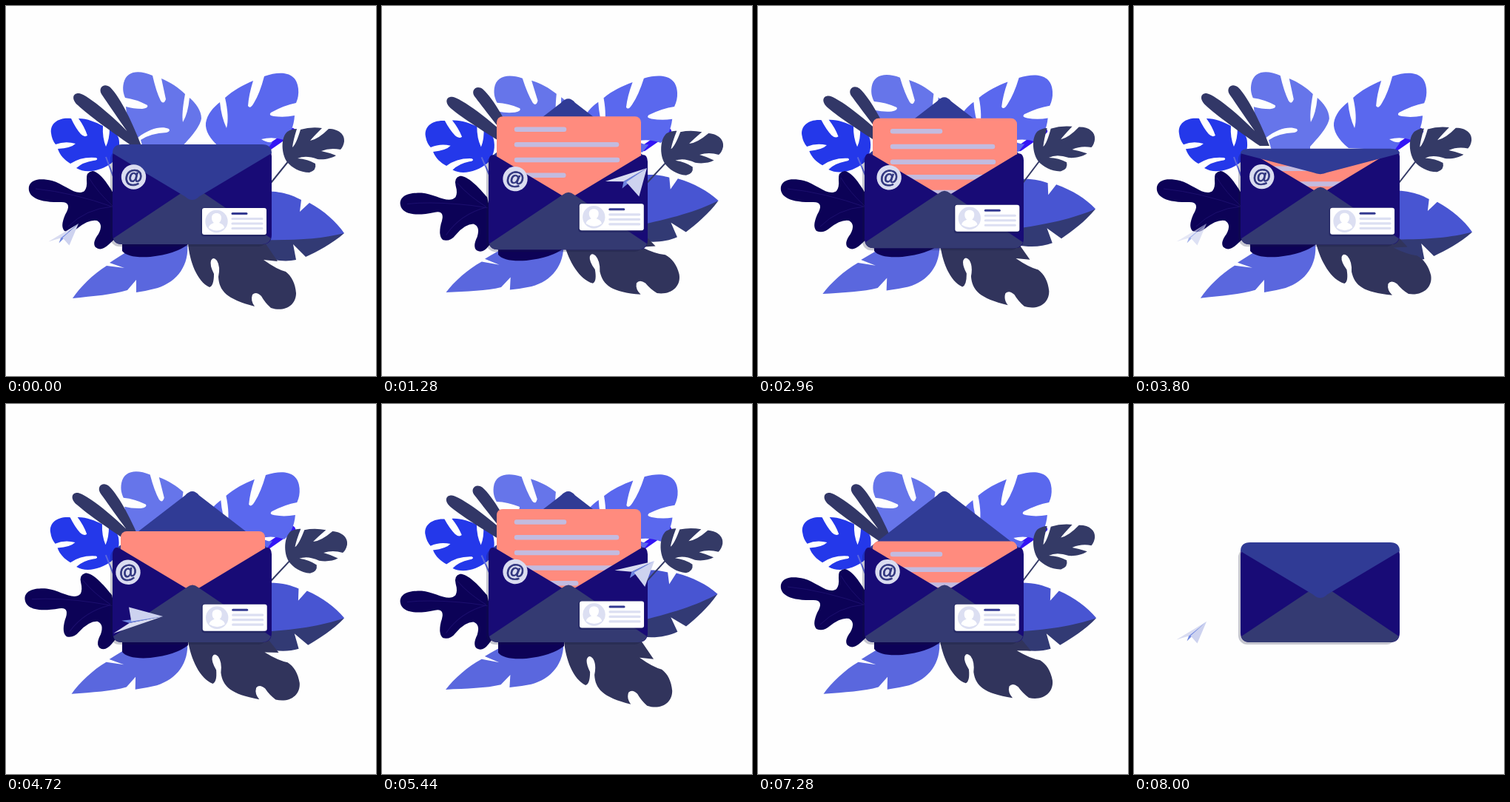
An HTML page for the animation above (8.04 s loop, 500 px wide and 500 px high).

```html
<!DOCTYPE html>
<html lang="en">
<head>
<meta charset="utf-8">
<title>Envelope</title>
<style>
html, body { margin: 0; width: 100%; height: 100%; overflow: hidden; background: #fefefe; }
svg { display: block; width: 100%; height: 100%; }
text { font: 800 25px "Liberation Sans", Arial, sans-serif; text-anchor: middle; fill: #30357f; stroke: #30357f; stroke-width: .7; }
</style>
</head>
<body>
<svg viewBox="0 0 500 500">
  <g id="leaves">
    <path id="upLeft" fill="#6675ea" d="M238 190C245 182 262 165 264 152C264 141 256 131 248 124Q246 145 239 157Q237 146 242 119C233 110 222 103 210 98Q213 112 216 126Q213 134 209 128Q203 116 198 94C180 86 163 87 159 104C157 113 159 119 161 124Q176 126 191 134Q193 138 184 139Q172 139 162 136C163 152 168 164 178 178C195 165 210 162 220 166Q223 169 217 171Q195 172 182 181L186 195H238Z"/>
    <path fill="none" stroke="#3315f5" stroke-width="8" stroke-linecap="round" d="M387 169L354 192"/>
    <path id="upRight" fill="#5a68ee" d="M290 192C275 180 269 168 270 158C272 146 280 137 289 130Q291 150 298 165Q302 150 296 124C307 114 320 107 334 101Q328 120 327 135Q330 140 335 131Q343 118 349 95C372 87 393 89 395 112Q396 122 392 131Q376 134 358 144Q354 148 362 149Q376 151 390 148C389 163 384 174 376 181Q360 176 345 180Q352 185 360 184L352 195Z"/>
    <g id="midLeft" fill="#2438ea">
      <path d="M143 212C150 205 154 195 153 184C153 176 148 170 140 165Q140 180 135 190Q130 178 131 162C121 157 110 152 98 152Q106 163 110 175Q106 178 101 173Q94 165 88 152C72 150 59 158 61 172Q62 181 67 187Q80 182 94 186Q88 192 70 193C73 202 79 208 87 213Q102 203 122 205Q126 208 118 209Q104 211 95 219C108 227 128 223 143 212Z"/>
      <path d="M135 204L147 236" stroke="#5a67de" stroke-width="2"/>
    </g>
    <path id="spears" fill="#323767" d="M170 189C140 168 112 148 97 134C88 126 90 117 99 118C110 120 150 152 182 189ZM178 189C162 168 138 132 129 119C124 110 133 103 141 110C155 124 172 160 183 189Z"/>
    <g id="navy" fill="#0c0257">
      <path d="M148 258C135 235 125 224 117 223Q108 224 109 235Q110 245 106 250C95 258 80 241 62 236C48 233 34 233 31 244C29 256 40 266 75 265Q90 265 80 282Q73 298 79 304Q88 308 97 300Q112 288 123 290Q132 295 125 308Q116 320 121 326Q128 332 138 323L150 312Z"/>
      <path d="M40 247Q90 252 146 272M112 232Q124 252 144 270M84 298Q108 274 144 271" fill="none" stroke="#1c0f6e"/>
    </g>
    <path id="lowLeft" fill="#5a67de" d="M90 395C100 380 118 362 136 351L160 354L140 347Q155 337 175 325L245 320C248 350 232 372 205 381Q190 385 176 387L176 370L164 384C145 390 118 392 90 395Z"/>
    <path id="lowMid" fill="#0d0257" d="M157 314V331Q165 341 195 339Q230 335 246 322V310Z"/>
    <g id="right">
      <path fill="#323a74" d="M457 307C440 322 420 332 405 339L388 322L392 343C378 346 360 344 345 338L330 310Z"/>
      <path fill="#4855d2" d="M340 250C372 249 388 256 399 262L397 278L410 266C430 277 446 291 457 307C425 315 390 317 340 316Z"/>
    </g>
    <g id="midRight" fill="#343a66">
      <path d="M380 211C372 200 371 178 380 170Q386 166 393 166Q388 182 387 191Q392 187 398 167Q412 163 427 165Q414 178 411 182Q422 180 436 166C450 166 458 174 457 183Q456 190 452 194Q438 191 426 196Q436 198 446 202C440 206 430 208 421 207Q405 201 394 206Q408 207 418 213Q420 222 410 225C397 225 386 218 380 211Z"/>
      <path d="M383 208L358 239" stroke="#343a66" stroke-width="2"/>
    </g>
    <path id="lowRight" fill="#31345c" d="M246 320C248 345 258 372 275 380Q281 378 281 362Q275 350 277 344Q280 338 285 344Q290 352 287 366C288 385 298 396 336 406Q330 398 333 390Q338 385 345 392Q350 401 358 408C376 414 392 405 392 388C391 375 386 365 378 359Q366 356 348 343L367 345L350 320Z"/>
  </g>
  <g id="envelope">
    <rect x="141" y="195" width="212" height="130" rx="12" fill="#14173c" opacity=".24"/>
    <path fill="#262f86" d="M147 197H356L252 258Z"/>
    <path id="flapBack" fill="#303b95"/>
    <g id="letter">
      <rect x="155" y="142" width="195" height="114" rx="8" fill="#ff8b7e"/>
      <g id="lines" stroke="#c3bbdf" stroke-width="6.5" stroke-linecap="round"></g>
    </g>
    <path fill="#180b76" d="M144 203Q145 190 155 196L252 254L348 196Q358 190 359 203V309Q359 322 346 322H157Q144 322 144 309Z"/>
    <path fill="#343a72" d="M145 314L244 248Q252 241 260 248L358 314Q355 322 346 322H157Q147 322 145 314Z"/>
    <path id="flapFront" fill="#303b95"/>
  </g>
  <g id="badge"><circle r="16.7" fill="#dadcf0"/><text y="7.5">@</text></g>
  <g id="card">
    <rect x="-1.5" y="-.5" width="89" height="39" rx="4" fill="#1b1d5c" opacity=".55"/>
    <rect width="87" height="36" rx="3" fill="#fff"/>
    <circle cx="19.5" cy="18" r="15.2" fill="#dcdff2"/>
    <path fill="#fff" d="M19.5 7C28 7 27 17 23 20C28 22 30 24 30 27Q20 34 9 27C9 24 11 22 16 20C12 17 11 7 19.5 7Z"/>
    <path stroke="#343a91" stroke-width="3" stroke-linecap="round" d="M41 7.5H60"/>
    <path stroke="#dcdff2" stroke-width="3.2" stroke-linecap="round" d="M41 14.5H81M41 21H81M41 27.5H81"/>
  </g>
  <g id="plane">
    <path fill="#d9dcf1" d="M0 0L-52 -28L-35 -10Z"/>
    <path fill="#6f86e0" d="M0 0L-35 -10L-43 -5Z"/>
    <path fill="#cdd2ef" d="M0 0L-33 -7L-35 19Z"/>
  </g>
</svg>
<script>
const $ = id => document.getElementById(id);
const LOOP = 8040, CYCLE = 4000, END = 8000;
const clamp = x => Math.max(0, Math.min(1, x));
const ease = x => (1 - Math.cos(Math.PI * clamp(x))) / 2;
const ramp = (t, from, to) => ease((t - from) / (to - from));
// 0 to 1 and back once per period
const swing = (t, period = CYCLE) => Math.sin(Math.PI * t / period) ** 2;
const place = (id, value) => $(id).setAttribute('transform', value);

// Leaves that share one slow swing: pivot and widest angle
const SWAY = {
  upLeft: [237, 190, -7],
  upRight: [295, 195, 4],
  midLeft: [143, 212, -4.3],
  spears: [180, 190, -4.7],
  lowLeft: [240, 325, 4.2],
  right: [255, 296, -17.5]
};

// Flight of the paper plane: time, nose x, nose y, heading, size, roll
const FLIGHT = [
  [0, 98, 294, -49, .87, .6],
  [720, 212, 287, -2, 1.3, -.57],
  [1280, 358, 219, -46, 1, 1],
  [2200, 415, 180, -20, .6, 1],
  [2600, 424, 174, -20, .4, 1]
];

const lines = [246, 317, 318, 317, 317].map((end, i) => {
  const el = document.createElementNS('http://www.w3.org/2000/svg', 'path');
  $('lines').append(el);
  return { el, end, y: 159.5 + i * 20.7, start: 785 + i * 140 };
});

function drawLeaves(t, c) {
  const turn = (id, x, y, angle) => place(id, `rotate(${angle} ${x} ${y})`);
  for (const [id, [x, y, angle]] of Object.entries(SWAY)) turn(id, x, y, angle * swing(t));
  const dip = ramp(c, 0, 1000) - ramp(c, 2200, 2960);
  turn('navy', 148, 290, -10.5 * dip);
  place('lowMid', `translate(0 ${5 * dip})`);
  turn('midRight', 358, 240, 1.5 * swing(t, CYCLE / 2) + 3.3 * Math.sin(2 * Math.PI * t / CYCLE));
  turn('lowRight', 250, 320, -10 * swing(t, END / 3));
}

// k runs from 1 (closed) to -1 (open)
function flapPath(k) {
  const h = k > 0 ? 65 * k : 79 * k, top = 197 - 10 * Math.max(k, 0);
  const side = 197 + h * .93;
  return `M144 199Q144 ${top} 157 ${top}H346Q359 ${top} 359 199L261 ${side}Q252 ${197 + h * 1.07} 242 ${side}Z`;
}

function drawEnvelope(t, c) {
  const bob = t < CYCLE ? 10 * swing(t) : 0;
  place('envelope', `translate(0 ${bob})`);

  const k = 1 - 2 * (ramp(c, 0, 400) - ramp(c, 3500, 3960));
  $('flapBack').setAttribute('d', k < 0 ? flapPath(k) : '');
  $('flapFront').setAttribute('d', k < 0 ? '' : flapPath(k));

  place('letter', `translate(0 ${60 * (1 - ramp(c, 380, 1060) + ramp(c, 2842, 3516))})`);
  for (const { el, end, y, start } of lines) {
    const p = clamp((c - start) / 160);
    el.setAttribute('d', p ? `M182 ${y}H${182 + (end - 182) * p}` : '');
  }

  const roll = -7.5 * ramp(c, 0, 700) + 15 * ramp(c, 720, 1280) - 7.5 * ramp(c, 2200, CYCLE);
  place('badge', `translate(${172.5 + roll} ${231 + bob - 4.5 * ramp(c, 0, 1000) + 4.5 * ramp(c, 3200, CYCLE)}) rotate(${1.3 * roll})`);
  place('card', `translate(${265 + 2.5 * swing(t)} ${273 - 8 * swing(t)})`);
}

function drawPlane(c) {
  const flying = c < 3000, time = flying ? c : 0;
  let i = 0;
  while (i < FLIGHT.length - 2 && time >= FLIGHT[i + 1][0]) i++;
  const a = FLIGHT[i], b = FLIGHT[i + 1], k = clamp((time - a[0]) / (b[0] - a[0]));
  const [, x, y, heading, size, roll] = a.map((v, j) => v + (b[j] - v) * k);
  place('plane', `translate(${x} ${y}) rotate(${heading}) scale(${size} ${size * roll})`);
  $('plane').setAttribute('opacity', flying ? 1 - ramp(c, 2250, 2600) : ramp(c, 3500, CYCLE));
}

function draw(t) {
  const c = t % CYCLE;
  drawLeaves(t, c);
  drawEnvelope(t, c);
  drawPlane(c);
  // The loop closes on the bare envelope
  for (const id of ['leaves', 'badge', 'card'])
    $(id).style.display = t >= END ? 'none' : '';
}

function tick() {
  draw(Math.floor(performance.now() % LOOP / 40) * 40);
  requestAnimationFrame(tick);
}
tick();
</script>
</body>
</html>
```
